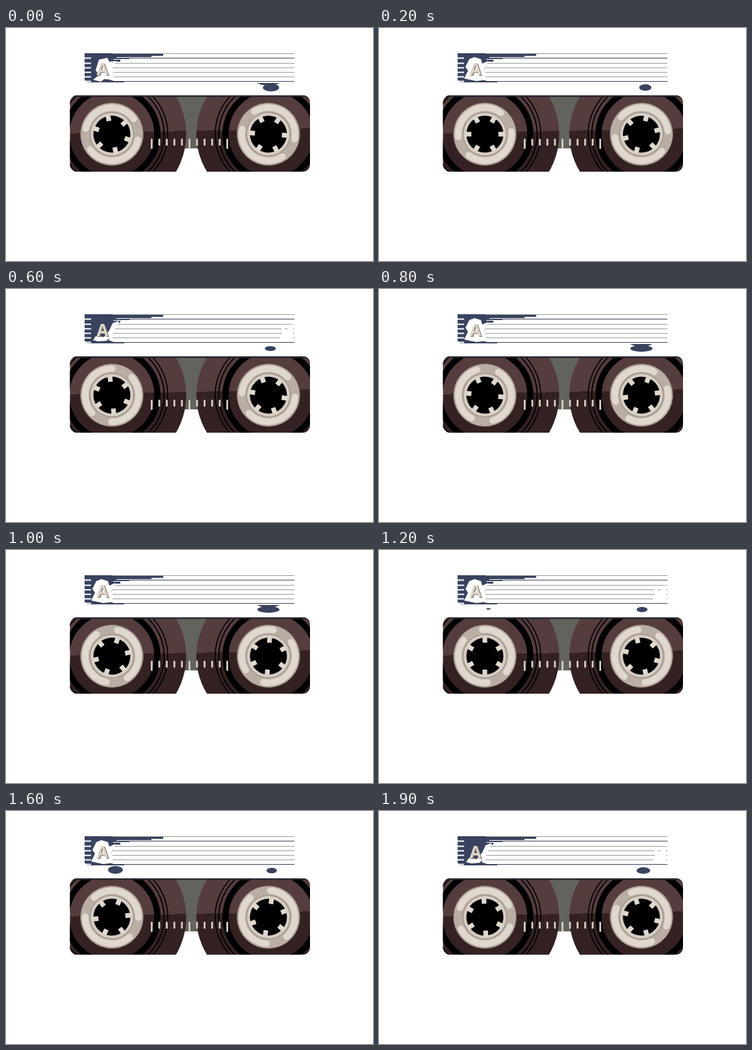
Animation of 565 by 360 pixels, one loop 2 s. Source, as an HTML page:

```html
<!DOCTYPE html>
<html lang="en">
<head>
<meta charset="utf-8">
<title>Cassette</title>
<style>
  html, body { margin: 0; width: 100%; height: 100%; overflow: hidden; background: #fff; }
  svg { display: block; width: 565px; height: 360px; }
  .letter { font: bold 26px "Noto Sans ExtraCondensed", "Noto Sans", sans-serif; font-stretch: 62.5%; text-anchor: middle; }
</style>
</head>
<body>
<svg viewBox="0 0 565 360">
  <defs>
    <clipPath id="body"><rect x="98.5" y="104" width="369.5" height="118" rx="11"/></clipPath>
    <linearGradient id="shell" gradientUnits="userSpaceOnUse" x1="283" y1="104" x2="285.4" y2="222">
      <stop offset=".466" stop-color="#553c3d"/>
      <stop offset=".466" stop-color="#342122"/>
    </linearGradient>
    <g id="rings" fill="none" stroke="#000">
      <circle r="70" stroke-width="9.5"/>
      <circle r="80.5" stroke-width="1.8"/>
      <circle r="86" stroke-width="1.6"/>
    </g>
    <g id="reel">
      <circle r="48.5" fill="#b9ada4" stroke="#6b5853" stroke-width=".8"/>
      <g id="arcs" fill="none" stroke="#e0d8ce" stroke-width="10" stroke-linecap="round"></g>
      <circle r="33.5" fill="#d6ccc2" stroke="#91847c"/>
      <circle r="28.5" fill="#000"/>
      <g id="teeth" fill="#e0d8ce"></g>
    </g>
  </defs>

  <g id="label">
    <path fill="#39435f" d="M121 39H182V40H242V43H224V45H206V47H190V49H176V52H167L162 66L158 79L166 82H182V84H125L121 80Z"/>
    <g id="rules"></g>
    <path id="halo" fill="#fff"/>
    <path id="worn" fill="#fff" d="M424 54L431 64L442 53V80L420 79L425 69Z"/>
    <text class="letter" x="150" y="73.5" fill="#7d746f">A</text>
    <text class="letter" x="148.5" y="72.5" fill="#ded5ca">A</text>
    <g fill="#39435f">
      <path id="neck" d="M386 85H421L414 88H394Z"/>
      <ellipse id="dripRight"/>
      <ellipse id="dripLeft"/>
    </g>
  </g>

  <g clip-path="url(#body)">
    <rect x="255" y="104" width="60" height="82" fill="#62635c"/>
    <circle cx="163" cy="164" r="114.5" fill="url(#shell)"/>
    <circle cx="404" cy="164" r="111" fill="url(#shell)"/>
    <use href="#rings" x="163" y="164"/>
    <use href="#rings" x="408" y="164"/>
    <path d="M98 104H468V106.5H98Z" fill="#2a2a37"/>
  </g>
  <g id="ticks" stroke="#d8cec4" stroke-width="2.8" stroke-linecap="round"></g>
  <use id="leftReel" href="#reel"/>
  <use id="rightReel" href="#reel"/>
</svg>
<script>
const $ = id => document.getElementById(id);
const STEP = 100, STEPS = 20, TURN = -9;

function add(parent, tag, attrs) {
  const node = document.createElementNS("http://www.w3.org/2000/svg", tag);
  set(node, attrs);
  parent.append(node);
}
function set(node, attrs) {
  for (const key in attrs) node.setAttribute(key, attrs[key]);
}
function polar(radius, degrees) {
  const a = degrees * Math.PI / 180;
  return `${radius * Math.cos(a)} ${radius * Math.sin(a)}`;
}

for (let i = 0; i < 6; i++)
  add($("teeth"), "rect", { x: 20.8, y: -3.6, width: 9, height: 7.2, transform: `rotate(${i * 60})` });

for (const start of [-6, 174])
  add($("arcs"), "path", { d: `M${polar(41, start)}A41 41 0 0 1 ${polar(41, start + 133)}` });

for (let i = 0; i < 11; i++)
  add($("ticks"), "path", { d: `M${224.3 + i * 11.63} 172.5V${i % 5 ? 180.5 : 185.5}` });

for (let i = 0; i < 7; i++) {
  const y = Math.round(39.2 + i * 7.2) + .5;
  const dark = i === 1 || i === 6;
  add($("rules"), "path", { d: `M${dark ? 121 : 164} ${y}H444`, stroke: dark ? "#39435f" : "#929c96" });
  if (i) add($("rules"), "path", { d: `M121 ${y}H131`, stroke: "#fff", "stroke-width": 2 });
}
add($("rules"), "path", { d: "M170 45.5H225M165 48.5H200", stroke: "#fff" });

const halos = {
  side: "M134 80L143 73L138 65L143 49L156 46L159 52L170 51L164 62L167 80L151 79L146 83Z",
  round: "M131 78L137 66L133 60L139 48L147 45L157 48L159 55L168 51L162 65L165 80L150 82Z",
  slash: "M134 79L138 73L151 74L159 64L164 53L174 49L164 70L155 80L142 81Z"
};

// step, halo, right drip x / rx / ry, left drip rx / ry, neck, worn
const poses = [
  [0, "side", 408, 12.5, 6, 0, 0, 1, 0],
  [2, "round", 410, 9.5, 5, 0, 0, 0, 0],
  [5, "slash", 407, 8.5, 3.8, 0, 0, 0, 1],
  [8, "round", 404, 17, 5, 0, 0, 1, 0],
  [11, "round", 405, 8.5, 4, 3.5, 1, 0, 1],
  [15, "round", 409, 8, 4.2, 11.5, 6, 0, 0],
  [18, "slash", 407, 10.5, 5, 0, 0, 0, 1]
];

function draw(step) {
  const angle = 18 + step * TURN;
  set($("leftReel"), { transform: `translate(163 164) rotate(${angle})` });
  set($("rightReel"), { transform: `translate(404 164) rotate(${angle + 46})` });

  const [, halo, x, rx, ry, leftRx, leftRy, neck, worn] = poses.findLast(pose => pose[0] <= step);
  set($("halo"), { d: halos[halo] });
  set($("dripRight"), { cx: x, cy: 92, rx, ry });
  set($("dripLeft"), { cx: 168.5, cy: 91, rx: leftRx, ry: leftRy });
  set($("neck"), { opacity: neck });
  set($("worn"), { opacity: worn });
}

const begin = performance.now();
function tick() {
  const elapsed = Math.max(0, performance.now() - begin);
  draw(Math.floor(elapsed / STEP) % STEPS);
  requestAnimationFrame(tick);
}
tick();
</script>
</body>
</html>
```
